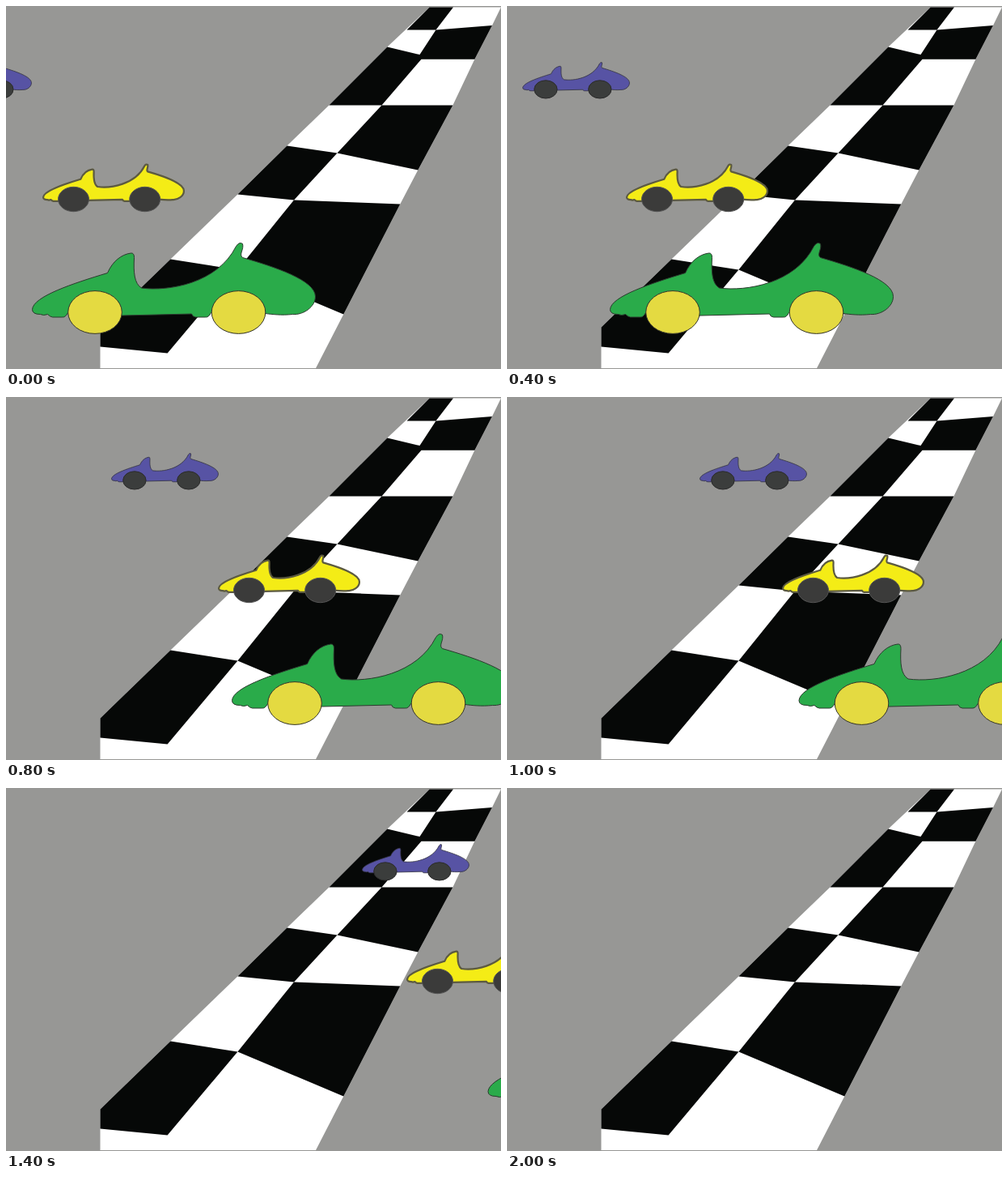
An HTML page for the animation above (2.2 s loop, 612 by 448 pixels).

```html
<!DOCTYPE html>
<html lang="en">
<head>
<meta charset="utf-8">
<title>Race to the line</title>
<style>
  html, body { margin: 0; width: 100%; height: 100%; overflow: hidden; background: #979795; }
  svg { display: block; width: 612px; height: 448px; }
  .body { vector-effect: non-scaling-stroke; stroke-linejoin: round; }
</style>
</head>
<body>
<svg viewBox="0 0 612 448">
  <defs>
    <!-- Car body with its nose tip at x = 0 and its highest point at y = 0 -->
    <path id="body" class="body" d="M0 82 C1 66 50 50 93 37 C99 23 110 14 122 12.500
      Q126 12 126 18 C125 36 126 50 135 55.500 C168 60 229 50 252 4 Q256 -2 260 1
      C262 8 255 14 260 18 C300 29.500 350 46 350 66 C350 79 335 89 322 88
      C308 89.500 296 88 288 87 L221 86 Q218 92 214 91.500 L202 91.500 Q198 91 197 87.500
      L112 89.500 L44 86 Q41 92 37 91.500 L25 91.500 Q22 91 19 88 Q14 90 10 88 Q0 88 0 82Z"/>
  </defs>
  <rect width="612" height="448" fill="#979795"/>
  <path fill="#fff" d="M523.500 1.500H612L601 24 579.400 65.700 552.400 122.400 509.300 202.500 487.300 244.500 417.300 380.400 383 447H116.500V396.500L203.400 312.400 286.400 232.400 347.400 172.500 399.400 122.400 471.400 50.500Z"/>
  <path fill="#060807" d="M523.500 1.500H553L531.500 29.400H495.500Z
    M531.500 29.400L601 24 579.400 65.700H513.500L511.500 60Z
    M471.400 50.500L511.500 60 513.500 65.700 464.500 122.400H399.400Z
    M464.500 122.400H552.400L509.300 202.500 409.500 181.500Z
    M347.400 172.500L409.500 181.500 356 239.400 286.400 232.400Z
    M356 239.400L487.300 244.500 417.300 380.400 286.400 325.500Z
    M203.400 312.400L286.400 325.500 199.600 428.500 116.500 420.500V396.500Z"/>
  <g id="cars"></g>
</svg>
<script>
const STEP = 200, LOOP = 2200, OFF = 700;

// xs: left edge of the car at each step
const cars = [
  { y: 69.5, sx: 0.377, sy: 0.385, fill: '#5753a4', line: '#33333f', width: 0.8,
    wheel: '#3b3d3c', rim: '#2b2b2b', rx: 14.2, ry: 11.1, wheelX: 28.4, wheelY: 33.4,
    xs: [-100.5, -41, 19.5, 65.5, 130.5, 238.5, 309.5, 440.5, 506.5, 546.5, OFF] },
  { y: 195.5, sx: 0.497, sy: 0.495, fill: '#f4ec16', line: '#5c5a40', width: 2.2,
    wheel: '#3b3b3a', rim: '#555', rx: 19, ry: 15.2, wheelX: 37.5, wheelY: 43,
    xs: [46, 97, 148, 200, 263, 341, 419, 496, 574, OFF, OFF] },
  { y: 292.5, sx: 1, sy: 1, fill: '#2aab4a', line: '#2b3a2e', width: 1,
    wheel: '#e4da41', rim: '#33332a', rx: 33.3, ry: 26.4, wheelX: 77.5, wheelY: 85.5,
    xs: [32.5, 80, 127.5, 195.5, 279.5, 361, 442.5, 596, OFF, OFF, OFF] }
];
const WHEELBASE = 177.5;

const layer = document.getElementById('cars');

function add(parent, tag, attributes) {
  const node = document.createElementNS('http://www.w3.org/2000/svg', tag);
  for (const name in attributes) node.setAttribute(name, attributes[name]);
  return parent.appendChild(node);
}

for (const car of cars) {
  car.node = add(layer, 'g', {});
  add(car.node, 'use', {
    href: '#body', transform: `scale(${car.sx} ${car.sy})`,
    fill: car.fill, stroke: car.line, 'stroke-width': car.width
  });
  for (const offset of [0, WHEELBASE * car.sx]) {
    add(car.node, 'ellipse', {
      cx: car.wheelX + offset, cy: car.wheelY, rx: car.rx, ry: car.ry,
      fill: car.wheel, stroke: car.rim, 'stroke-width': 1
    });
  }
}

function draw(now) {
  const step = Math.floor((now % LOOP) / STEP);
  for (const car of cars) {
    car.node.setAttribute('transform', `translate(${car.xs[step]} ${car.y})`);
  }
}

const start = performance.now();
function tick() {
  draw(performance.now() - start);
  requestAnimationFrame(tick);
}
tick();
</script>
</body>
</html>
```
